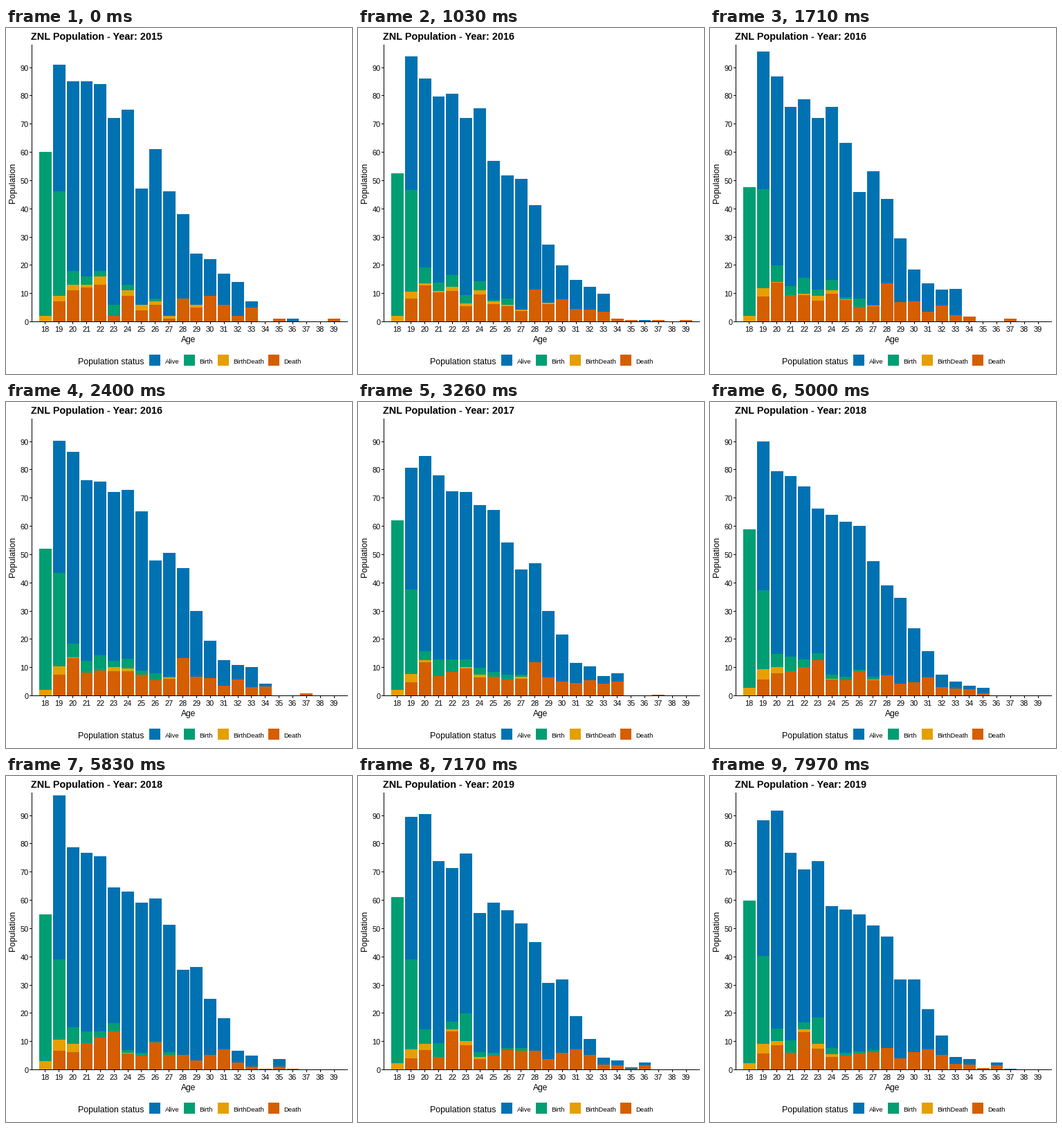
Write a matplotlib script that moves like this. It is 500x500 px and loops after 8 s.

```python
import numpy as np
import matplotlib.pyplot as plt
from matplotlib.animation import FuncAnimation
from matplotlib.patches import Rectangle

SIZE, DPI = 500, 100
FRAMES, LOOP_MS = 280, 8000
STEPS_PER_YEAR = 66
FIRST_YEAR, FIRST_AGE, AGES = 2015, 18, 22

# Panel in pixels, y pointing down
LEFT, RIGHT, TOP, BASE = 37, 494, 24, 424
X_UNIT = (RIGHT - LEFT) / 23
Y_UNIT = (BASE - TOP) / 98
BAR_W = 0.9 * X_UNIT

COLORS = {"Alive": "#0072B2", "Birth": "#009E73",
          "BirthDeath": "#E69F00", "Death": "#D55E00"}

# One row per year, counted from age 18 upwards
DEATHS = [
    [0, 7, 11, 12, 13, 2, 9, 4, 6, 1, 8, 5, 9, 6, 2, 5, 0, 1, 0, 0, 0, 1],
    [0, 9, 14, 9, 9, 8, 10, 8, 5, 6, 14, 7, 7, 3, 6, 2, 2, 0, 0, 1],
    [0, 3, 11, 6, 8, 10, 5, 6, 6, 6, 11, 6, 4, 5, 5, 5, 6],
    [0, 7, 6, 10, 11, 14, 6, 5, 10, 5, 5, 3, 5, 7, 2, 1, 0, 1],
    [0, 3, 7, 3, 14, 7, 3, 5, 6, 7, 7, 4, 6, 7, 6, 2, 2, 0, 2],
    [0, 15, 14, 17, 10, 9, 10, 5, 4, 3, 10, 4, 7, 8, 2, 2, 1, 2],
]
BIRTH_DEATHS = [
    [2, 2, 2, 1, 3, 0, 2, 2, 1, 1, 0, 1],
    [2, 3, 0, 0, 0, 2, 1],
    [2, 3, 1, 0, 0, 0, 1, 0, 0, 1],
    [3, 4, 3],
    [2, 3, 2, 0, 1, 2, 1],
    [3, 5, 0, 0, 1, 0, 1],
]
BIRTHS = [
    [58, 37, 5, 3, 2, 4, 2, 0, 1],
    [44, 35, 6, 3, 6, 2, 4, 1, 3],
    [66, 28, 2, 7, 4, 3, 2, 2, 1, 1],
    [51, 28, 6, 4, 2, 2, 1, 1, 0, 1],
    [61, 33, 5, 5, 3, 12, 2, 1, 1, 1],
    [45, 25, 2, 2, 1, 0, 2],
]
FIRST_ALIVE = [0, 45, 67, 69, 66, 66, 62, 41, 53, 44, 30, 18, 13, 11, 12, 2,
               0, 0, 1]
# Net transfers by age on entering each later year
TRANSFERS = [
    {20: -1, 24: 1},
    {20: -3, 21: -1, 24: -1, 25: -1},
    {20: -1, 21: 1, 22: 1, 23: -1, 24: 1, 26: 1, 27: -2, 31: -1},
    {22: -1, 23: 1, 24: 1, 28: 2, 32: 1},
    {19: 2, 21: 3, 22: 2, 23: -4, 24: 2, 25: -1, 27: -2, 28: -1, 29: 2,
     30: -1, 31: 2},
]


def padded(row):
    return np.pad(np.array(row, float), (0, AGES - len(row)))


def build_stacks():
    """Stack tops per year: rows Death, BirthDeath, Birth, Alive."""
    stacks, alive = [], padded(FIRST_ALIVE)
    for y in range(len(DEATHS)):
        death, both, birth = (padded(t[y]) for t in (DEATHS, BIRTH_DEATHS, BIRTHS))
        if y:
            # Survivors and newcomers grow one year older
            alive = np.concatenate(([0], joined[:-1])) - death
            for age, n in TRANSFERS[y - 1].items():
                alive[age - FIRST_AGE] += n
        joined = alive + birth
        stacks.append(np.cumsum([death, both, birth, alive], axis=0))
    return np.array(stacks)


STACKS = build_stacks()

fig = plt.figure(figsize=(SIZE / DPI, SIZE / DPI), dpi=DPI, facecolor="white")
ax = fig.add_axes([0, 0, 1, 1])
ax.set_xlim(0, SIZE)
ax.set_ylim(SIZE, 0)
ax.axis("off")


def box(x, y, w, h, color, z=1):
    return ax.add_patch(Rectangle((x, y), w, h, fc=color, lw=0,
                                  antialiased=False, zorder=z))


def label(x, y, text, px, ha="left", va="baseline", **kw):
    return ax.text(x, y, text, fontsize=px * 72 / DPI, ha=ha, va=va,
                   color="black", family="Liberation Sans", **kw)


def age_x(i):
    return LEFT + (i + 1) * X_UNIT


# Taller parts are drawn first, so each shorter one covers their lower end
bars = [[box(age_x(i) - BAR_W / 2, BASE, BAR_W, 0, color, z) for i in range(AGES)]
        for z, color in enumerate(COLORS.values(), 1)][::-1]

# Axes
box(LEFT, TOP, 1, BASE - TOP + 1, "black", 6)
box(LEFT, BASE, RIGHT - LEFT, 1, "black", 6)
for v in range(0, 100, 10):
    y = round(BASE - v * Y_UNIT)
    box(LEFT - 3, y, 3, 1, "black", 6)
    label(32.5, y + 5, str(v), 11, ha="right")
for i in range(AGES):
    box(round(age_x(i) - 0.5), BASE + 1, 1, 3, "black", 6)
    label(age_x(i) - 0.3, 439, str(FIRST_AGE + i), 11, ha="center")
label(264, 454, "Age", 12, ha="center")
label(16.5, 224, "Population", 12.3, ha="right", va="center", rotation=90)
title = label(36.5, 17, "", 14.4, weight="bold")

# Legend
label(104, 486, "Population status", 12.4)
for x, (name, color) in zip((207, 257, 306, 379), COLORS.items()):
    box(x, 472, 16, 16, color)
    label(x + 22.5, 485, name, 9.5)


def draw(frame):
    pos = frame / STEPS_PER_YEAR
    y = int(pos)
    part = pos - y
    tops = (1 - part) * STACKS[y] + part * STACKS[y + 1]
    for row, values in zip(bars, tops):
        for bar, v in zip(row, values):
            bar.set_y(BASE - v * Y_UNIT)
            bar.set_height(v * Y_UNIT)
    title.set_text(f"ZNL Population - Year: {FIRST_YEAR + int(pos + 0.5)}")
    return [title]


anim = FuncAnimation(fig, draw, frames=FRAMES, interval=LOOP_MS / FRAMES,
                     init_func=lambda: draw(0), repeat=True, repeat_delay=0)
plt.show()
```
